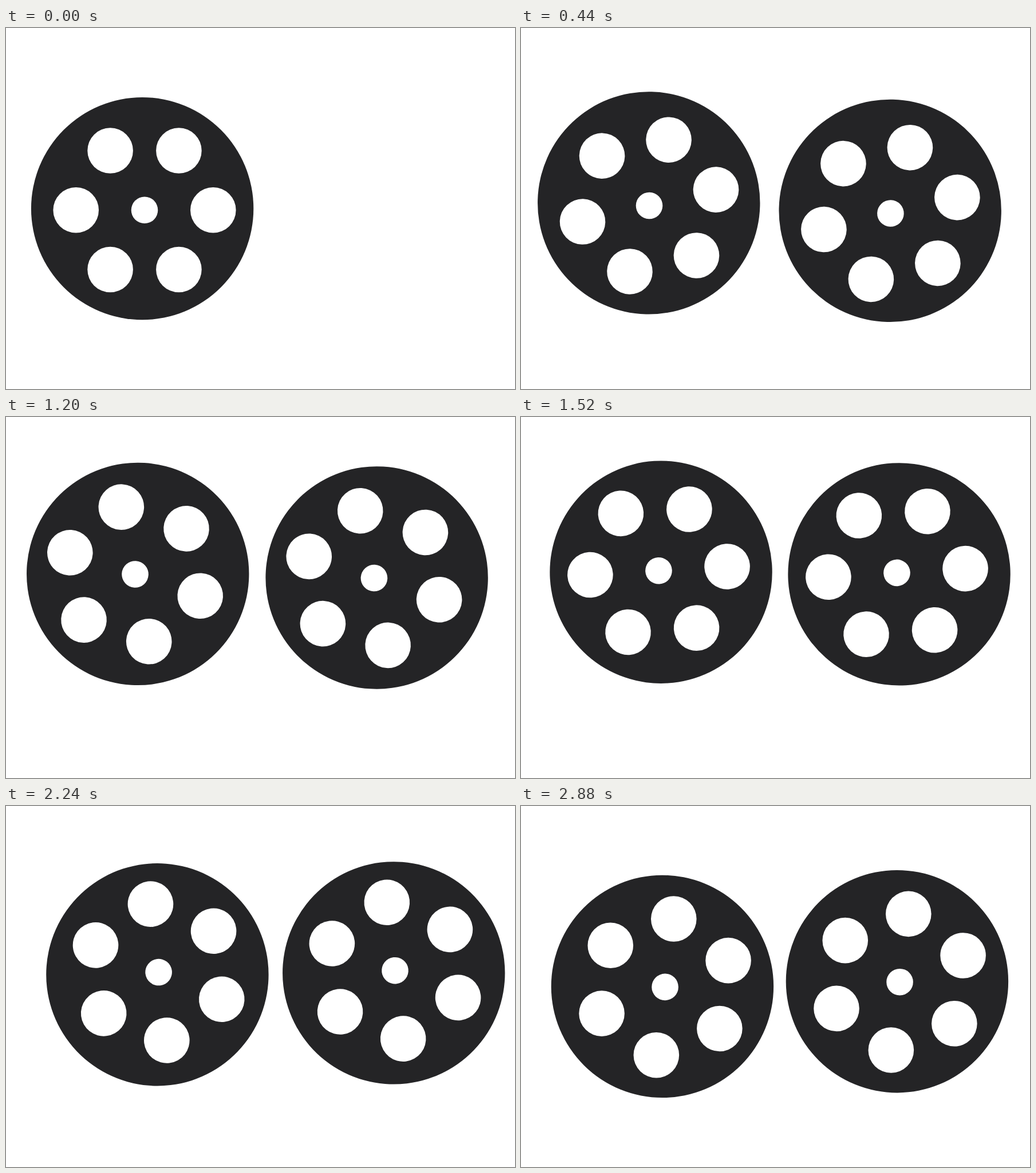
An HTML page for the animation above (2.92 s loop, 889 by 630 pixels).

```html
<!DOCTYPE html>
<html lang="en">
<head>
<meta charset="utf-8">
<title>Film reels</title>
<style>
  html, body { margin: 0; width: 100%; height: 100%; overflow: hidden; background: #fff; }
  svg { display: block; width: 100%; height: 100%; }
</style>
</head>
<body>
<svg viewBox="0 0 889 630">
  <defs>
    <!-- drawn around the pivot; the disc sits slightly off the hub -->
    <g id="reel">
      <circle cx="-3.9" cy="22.1" r="194.2" fill="#242426"/>
      <g id="holes" fill="#fff" transform="translate(0 24.8)">
        <circle r="23.3"/>
      </g>
    </g>
  </defs>
  <use id="left" href="#reel"/>
  <use id="right" href="#reel"/>
</svg>
<script>
const LOOP = 2920, STEP = 40, RIGHT_START = 360;
const PIVOT = { x: 242, y: 293 };
const HOLES = 6, HOLE_RING = 119.8, HOLE_R = 39.8;

// [time in ms, value]
const TURN = [[0, 0], [200, 19.5], [440, 46.5], [880, 100.2], [1520, 176.5],
              [1960, 230.3], [2480, 291.4], [2880, 337.3]];
const GAP_X = [[0, 423.8], [440, 421.4], [880, 418.8], [1520, 416], [1960, 414.1], [2880, 410]];
const GAP_Y = [[0, 17.5], [2880, -8.7]];

const left = document.getElementById("left");
const right = document.getElementById("right");
const holes = document.getElementById("holes");

for (let i = 0; i < HOLES; i++) {
  const a = i * 2 * Math.PI / HOLES;
  const hole = document.createElementNS("http://www.w3.org/2000/svg", "circle");
  hole.setAttribute("cx", HOLE_RING * Math.cos(a));
  hole.setAttribute("cy", HOLE_RING * Math.sin(a));
  hole.setAttribute("r", HOLE_R);
  holes.append(hole);
}

function valueAt(keys, t) {
  let i = 1;
  while (i < keys.length - 1 && keys[i][0] < t) i++;
  const [t0, v0] = keys[i - 1], [t1, v1] = keys[i];
  return v0 + (v1 - v0) * (t - t0) / (t1 - t0);
}

function place(reel, x, y, angle) {
  reel.setAttribute("transform", `translate(${x} ${y}) rotate(${angle})`);
}

function draw(t) {
  const angle = valueAt(TURN, t);
  place(left, PIVOT.x, PIVOT.y, angle);
  place(right, PIVOT.x + valueAt(GAP_X, t), PIVOT.y + valueAt(GAP_Y, t), angle);
  right.style.display = t < RIGHT_START ? "none" : "";
}

const start = performance.now();
function tick() {
  const t = (performance.now() - start) % LOOP;
  draw(Math.floor(t / STEP) * STEP);
  requestAnimationFrame(tick);
}
draw(0);
requestAnimationFrame(tick);
</script>
</body>
</html>
```
